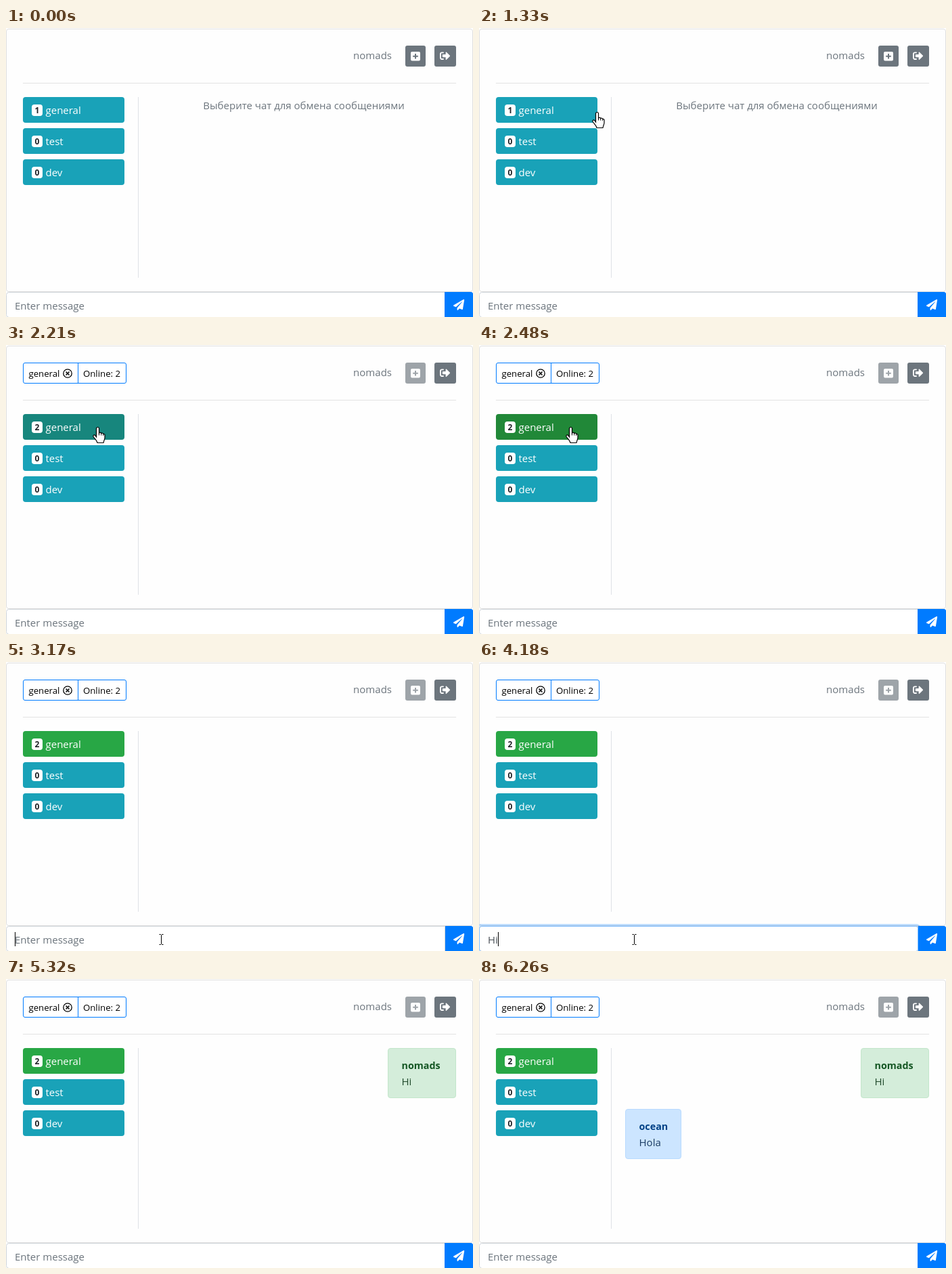
Recreate the animation shown at these times as an HTML page. Size 690x427 px, loop 8.06 s.

```html
<!DOCTYPE html>
<html lang="ru">
<head>
<meta charset="utf-8">
<title>Chat</title>
<style>
  html, body { margin: 0; width: 100%; height: 100%; overflow: hidden; background: #fff; }
  svg { display: block; }
  text { font: 15px "Open Sans", "Noto Sans", sans-serif; }
  .muted { fill: #6c757d; }
  .small { font-size: 13.2px; }
  .name { font-size: 14.3px; font-weight: 700; }
  .badge { font-size: 12px; font-weight: 700; fill: #212529; text-anchor: middle; }
  .line { fill: none; stroke: #000; }
</style>
</head>
<body>
<svg width="690" height="427" viewBox="0 0 690 427">
  <rect x=".5" y="1.5" width="689" height="388" rx="3.5" fill="#fefefe" stroke="#dfdfdf"/>
  <path d="M25 81.5H665" stroke="#e2e2e2"/>
  <path d="M195.5 102V369" stroke="#dee2e6"/>

  <text class="muted" x="570" y="46" text-anchor="end">nomads</text>
  <g id="add">
    <rect x="590" y="26" width="30" height="31" rx="3" fill="#6c757d"/>
    <rect x="598" y="35" width="14" height="13.5" rx="2" fill="#fff"/>
    <path d="M605 38v7.5M601.2 41.75h7.6" stroke="#6c757d" stroke-width="2"/>
  </g>
  <rect x="633" y="26" width="32" height="31" rx="3" fill="#6c757d"/>
  <path transform="translate(641 33.5) scale(.03)" fill="#fff" d="M497 273L329 441c-15 15-41 4-41-17v-96H152c-13 0-24-11-24-24v-96c0-13 11-24 24-24h136V88c0-21 26-32 41-17l168 168c9 9 9 25 0 34zM192 436v-40c0-7-5-12-12-12H96c-18 0-32-14-32-32V160c0-18 14-32 32-32h84c7 0 12-5 12-12V76c0-7-5-12-12-12H96c-53 0-96 43-96 96v192c0 53 43 96 96 96h84c7 0 12-5 12-12z"/>

  <text id="hint" class="muted" x="440" y="120" text-anchor="middle">Выберите чат для обмена сообщениями</text>

  <g id="tag">
    <rect x="25.5" y="26.5" width="152" height="30" rx="2.5" fill="#fff" stroke="#007bff"/>
    <path d="M106.5 27v29" stroke="#007bff"/>
    <text class="small" x="33.5" y="47">general</text>
    <circle class="line" cx="91" cy="42" r="6.2" stroke-width="1.3"/>
    <path class="line" d="M88.5 39.5l5 5m0-5l-5 5" stroke-width="1.6"/>
    <text class="small" x="114" y="47">Online: 2</text>
  </g>

  <g id="rooms"></g>
  <g id="messages"></g>

  <path d="M648 390H686a4 4 0 0 1 4 4V428H648z" fill="#007bff"/>
  <path d="M648.5 390.5H4.5a4 4 0 0 0-4 4V423.5a4 4 0 0 0 4 4H648.5" fill="#fff" stroke="#ced4da"/>
  <path d="M648 390H686a4 4 0 0 1 4 4V428H648z" fill="#007bff"/>
  <path id="edge" d="M648.5 390V428" stroke="#ced4da"/>
  <g id="ring" fill="none">
    <rect x="-1.5" y="388.5" width="652" height="41" rx="4" stroke="#007bff" stroke-opacity=".25" stroke-width="3"/>
    <rect x=".5" y="390.5" width="648" height="37" rx="3" stroke="#80bdff"/>
  </g>
  <path transform="translate(661 401) scale(.0315)" fill="#fff" d="M476 3L12 271c-18 10-15 35 3 43l106 44 287-253c6-5 14 3 9 9L176 407v80c0 24 28 33 42 16l64-77 125 52c14 6 30-3 33-18l72-432C515 8 493-7 476 3z"/>
  <text id="entry" x="13" y="416"></text>
  <rect id="caret" y="399" width="1" height="21" fill="#000"/>

  <g id="arrow" fill="#fff" stroke="#000">
    <path d="M.5 .5V16.5L4.2 13 6.8 18.5 9 17.5 6.5 12H11.5z"/>
  </g>
  <g id="hand" fill="#fff" stroke="#000">
    <path d="M5.5 15V2.5a2 2 0 0 1 4 0V9a2 2 0 0 1 3.3 .6 2 2 0 0 1 3 .8 1.7 1.7 0 0 1 2.2 1.6V16c0 2.5-1.5 4-2 7.5H7C6.5 20.5 3 17.5 1 14.2c-.8-1.6 1.3-3 2.6-1.7z" stroke-width="1.2"/>
    <path class="line" d="M9.5 9v3.5M12.7 9.6v3M15.7 10.4v2.5"/>
  </g>
  <g id="beam">
    <path class="line" d="M.5 .5h2l1 1 1-1h2M3.5 1.5v13M.5 15.5h2l1-1 1 1h2"/>
  </g>
</svg>
<script>
const LOOP = 8060;
const $ = id => document.getElementById(id);
const show = (id, on) => $(id).setAttribute('visibility', on ? 'visible' : 'hidden');

$('rooms').innerHTML = ['general', 'test', 'dev'].map((name, i) => {
  const y = 102 + i * 46;
  return `<rect ${i ? '' : 'id="room"'} x="25" y="${y}" width="150" height="38" rx="4" fill="#19a2b8"/>
    <rect x="38" y="${y + 11}" width="16" height="17" rx="4" fill="#fff"/>
    <text ${i ? '' : 'id="count"'} class="badge" x="46" y="${y + 24}">${i ? 0 : 1}</text>
    <text x="58.5" y="${y + 25}" fill="#fff">${name}</text>`;
}).join('');

const bubble = (id, x, y, w, fill, stroke, head, ink, name, body) =>
  `<g id="${id}"><rect x="${x + .5}" y="${y + .5}" width="${w - 1}" height="73" rx="3.5" fill="${fill}" stroke="${stroke}"/>
    <text class="name" x="${x + 20.5}" y="${y + 31}" fill="${head}">${name}</text>
    <text x="${x + 20.5}" y="${y + 55}" fill="${ink}">${body}</text></g>`;
$('messages').innerHTML =
  bubble('mine', 564, 102, 101, '#d4edda', '#c3e6cb', '#155724', '#20492b', 'nomads', 'Hi') +
  bubble('reply', 216, 192, 83, '#cce5ff', '#b8daff', '#004085', '#1b3c62', 'ocean', 'Hola');

// Each track lists [start time, value...]; a value holds until the next entry.
const pointer = [
  [0, ''], [280, 'arrow', 677, 89], [420, 'arrow', 585, 96], [540, 'arrow', 440, 105],
  [660, 'arrow', 325, 112], [790, 'arrow', 248, 117], [910, 'arrow', 209, 119],
  [1060, 'arrow', 197, 122], [1210, 'arrow', 184, 125], [1330, 'hand', 167, 124],
  [1470, 'hand', 155, 122], [1600, 'hand', 147, 121], [1720, 'hand', 141, 121],
  [1840, 'hand', 135, 121], [1960, 'hand', 131, 121], [2090, 'hand', 128, 121],
  [2630, 'beam', 235, 411], [2780, 'beam', 230, 406], [2900, 'beam', 226, 402], [4740, '']
];
const roomFill = [
  [0, '#19a2b8'], [1470, '#1693a7'], [1600, '#138496'], [2210, '#17867d'],
  [2360, '#1e8753'], [2480, '#218838'], [2630, '#23923c'], [2780, '#26a042'], [2900, '#28a745']
];
const entry = [[0, ''], [3900, 'H'], [4180, 'Hi'], [4310, '']];
const caret = [[0, 0], [3170, 13], [3750, 0], [3900, 24], [4180, 28], [4310, 13], [4890, 0]];
const ring = [[0, 0], [3320, 1], [5170, .5], [5320, 0]];

const at = (track, t) => track.findLast(step => step[0] <= t).slice(1);

function draw(t) {
  const [kind, x, y] = at(pointer, t);
  for (const id of ['arrow', 'hand', 'beam']) show(id, id === kind);
  if (kind) $(kind).setAttribute('transform', `translate(${x} ${y})`);

  const joined = t >= 2210;
  show('hint', !joined);
  show('tag', joined);
  $('add').setAttribute('opacity', joined ? .65 : 1);
  $('count').textContent = joined ? 2 : 1;
  $('room').setAttribute('fill', at(roomFill, t)[0]);

  const [typed] = at(entry, t);
  $('entry').textContent = typed || 'Enter message';
  $('entry').setAttribute('fill', typed ? '#495057' : '#6c757d');
  const [caretX] = at(caret, t);
  show('caret', caretX > 0);
  $('caret').setAttribute('x', caretX);
  $('ring').setAttribute('opacity', at(ring, t)[0]);
  show('edge', t >= 3050 && t < 5170);

  show('mine', t >= 4310);
  show('reply', t >= 6260);
}

const start = performance.now();
function tick() {
  draw((performance.now() - start) % LOOP);
  requestAnimationFrame(tick);
}
tick();
</script>
</body>
</html>
```
